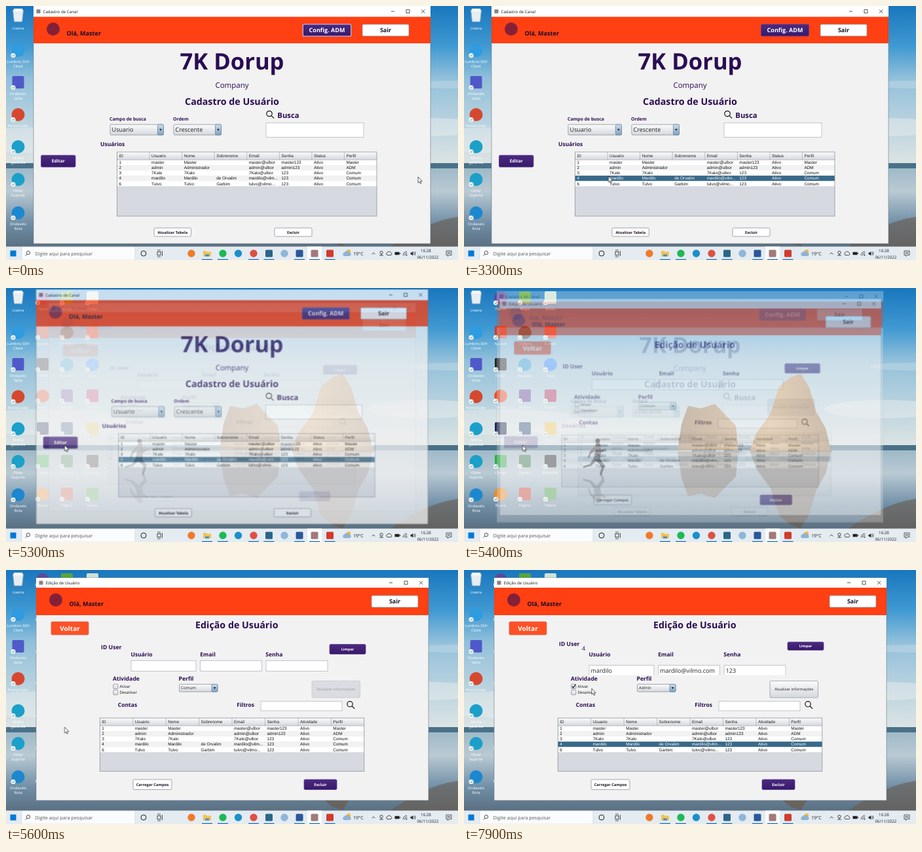
Recreate the animation shown at these times as an HTML page. Size 690 by 388 pixels, loop 8000 ms.

```html
<!DOCTYPE html>
<html lang="pt-BR">
<head>
<meta charset="utf-8">
<title>Cadastro de Usuário</title>
<style>
html, body { margin: 0; width: 100%; height: 100%; overflow: hidden; background: #4b9fd4; }
svg { display: block; width: 100%; height: 100%; text-rendering: geometricPrecision; }
text { font-family: "Open Sans", "Noto Sans", sans-serif; }
.cell { font-family: "Liberation Sans", Arial, sans-serif; }
.b { font-weight: 700; }
.mid { text-anchor: middle; }
.anim { animation: 8s step-end -5ms infinite; transform-origin: 345px 182px; }
#list { animation-name: closing; }
#edit { animation-name: opening; }
#ring { animation-name: blur; }
#listSel { animation-name: pickList; }
#editSel { animation-name: pickEdit; }
#blank { animation-name: drop; }
#filled { animation-name: fill; }
#cursor { animation-name: move; transform-origin: 0 0; }
@keyframes closing {
  0%, 65% { opacity: 1; transform: none; }
  66.25% { opacity: .75; transform: scale(.987); }
  67.5% { opacity: .28; transform: scale(.974); }
  68.75%, 100% { opacity: 0; transform: scale(.96); }
}
@keyframes opening {
  0%, 65% { opacity: 0; transform: scale(.92); }
  66.25% { opacity: .1; transform: scale(.935); }
  67.5% { opacity: .42; transform: scale(.972); }
  68.75% { opacity: .92; transform: scale(.996); }
  70%, 100% { opacity: 1; transform: none; }
}
@keyframes blur { 0% { opacity: 1; } 41.25%, 100% { opacity: 0; } }
@keyframes pickList { 0% { opacity: 0; } 41.25%, 100% { opacity: 1; } }
@keyframes pickEdit { 0% { opacity: 0; } 95%, 100% { opacity: 1; } }
@keyframes drop { 0% { opacity: 1; } 97.5%, 100% { opacity: 0; } }
@keyframes fill { 0% { opacity: 0; } 97.5%, 100% { opacity: 1; } }
</style>
</head>
<body>
<svg id="stage" viewBox="0 0 690 388" preserveAspectRatio="none">
  <defs>
    <linearGradient id="sky" x2="0" y2="1">
      <stop offset="0" stop-color="#1a77bd"/><stop offset=".25" stop-color="#3f99d2"/>
      <stop offset=".45" stop-color="#92c0da"/><stop offset="1" stop-color="#dfe5e4"/>
    </linearGradient>
    <linearGradient id="sand" x2="0" y2="1">
      <stop offset="0" stop-color="#9fb9c8"/><stop offset=".25" stop-color="#b9cad3"/>
      <stop offset=".6" stop-color="#6f8ea6"/><stop offset="1" stop-color="#4f5f6d"/>
    </linearGradient>
    <linearGradient id="rock" x2="1" y2="0">
      <stop offset="0" stop-color="#8c6a48"/><stop offset=".6" stop-color="#cfa168"/><stop offset="1" stop-color="#94704c"/>
    </linearGradient>
    <linearGradient id="grey" x2="0" y2="1">
      <stop offset="0" stop-color="#fbfbfc"/><stop offset="1" stop-color="#d5d8dd"/>
    </linearGradient>
    <linearGradient id="blue" x2="0" y2="1">
      <stop offset="0" stop-color="#cfdde9"/><stop offset="1" stop-color="#7fa3c2"/>
    </linearGradient>
    <linearGradient id="violet" x2="0" y2="1">
      <stop offset="0" stop-color="#4b2a80"/><stop offset="1" stop-color="#38196a"/>
    </linearGradient>
  </defs>
</svg>
<script>
const INK = '#2a0d52', ORANGE = '#ff4013';

const rect = (x, y, w, h, fill, more = '') =>
  `<rect x="${x}" y="${y}" width="${w}" height="${h}" fill="${fill}" ${more}/>`;
const dot = (x, y, r, fill, more = '') => `<circle cx="${x}" cy="${y}" r="${r}" fill="${fill}" ${more}/>`;
const line = (d, color, w = .8) => `<path d="${d}" fill="none" stroke="${color}" stroke-width="${w}"/>`;
const text = (x, y, size, s, fill = INK, cls = '') =>
  `<text x="${x}" y="${y}" font-size="${size}" fill="${fill}" class="${cls}">${s}</text>`;
const bold = (x, y, size, s, fill = INK) => text(x, y, size, s, fill, 'b');
const group = (id, body) => `<g id="${id}" class="anim">${body}</g>`;

function button(x, y, w, h, s, size, fill, color, edge, weight = 'b') {
  return rect(x, y, w, h, fill, `rx="1.8" stroke="${edge}" stroke-width=".8"`) +
    text(x + w / 2, y + h / 2 + size * .36, size, s, color, weight + ' mid');
}
const purple = (x, y, w, h, s, size) => button(x, y, w, h, s, size, 'url(#violet)', '#fff', '#5c4390');
const white = (x, y, w, h, s, size) => button(x, y, w, h, s, size, '#fff', '#1d1426', '#8d9199');
const field = (x, y, w, h) => rect(x, y, w, h, '#fff', 'stroke="#b4b8be" stroke-width=".8"');

function combo(x, y, w, h, s, size) {
  const ax = x + w - 4.5, ay = y + h / 2;
  return rect(x, y, w, h, 'url(#grey)', 'rx="1.5" stroke="#8a9098" stroke-width=".8"') +
    rect(x + w - 9, y, 9, h, 'url(#blue)', 'rx="1.5" stroke="#5d7d99" stroke-width=".7"') +
    `<path d="M${ax - 2} ${ay - 1.3}h4l-2 3z" fill="#1c2733"/>` +
    text(x + 2.6, ay + size * .36, size, s, '#222');
}

function lens(x, y, r) {
  return `<g fill="none" stroke="#151515" stroke-width="1.2"><circle cx="${x}" cy="${y}" r="${r}"/>` +
    `<path d="M${x + r * .7} ${y + r * .7}l${r} ${r}"/></g>`;
}

const users = [
  ['1', 'master', 'Master', '', 'master@ulbor', 'master123', 'Ativo', 'Master'],
  ['2', 'admin', 'Administrador', '', 'admin@ulbor', 'admin123', 'Ativo', 'ADM'],
  ['3', '7Kalo', '7Kalo', '', '7Kalo@ulbor', '123', 'Ativo', 'Comum'],
  ['4', 'mardilo', 'Mardilo', 'de Orvalim', 'mardilo@vilm...', '123', 'Ativo', 'Comum'],
  ['6', 'Tulvo', 'Tulvo', 'Garbim', 'tulvo@vilmo...', '123', 'Ativo', 'Comum']
];

function table(x, y, w, h, status, selId) {
  const cw = w / 8, rh = 8.05, top = y + 12;
  const cells = (row, by, color) => row.map((s, i) =>
    text(x + i * cw + 3, by, 6.4, s, color, 'cell')).join('');
  const rowY = i => top + i * rh;
  let out = rect(x, y, w, h, '#d6d9df') + rect(x, y, w, 12, 'url(#grey)');
  users.forEach((u, i) => {
    out += rect(x, rowY(i), w, rh, i % 2 ? '#f2f2f2' : '#fff') + cells(u, rowY(i) + 6.3, '#111');
  });
  out += group(selId, rect(x, rowY(3), w, rh, '#39698a') + cells(users[3], rowY(3) + 6.3, '#fff'));
  out += cells(['ID', 'Usuario', 'Nome', 'Sobrenome', 'Email', 'Senha', status, 'Perfil'], y + 8.2, '#222');
  for (let i = 1; i < 8; i++) out += line(`M${x + i * cw} ${y}v12`, '#a4a9b1', .7);
  return out + line(`M${x} ${top}h${w}`, '#a4a9b1', .7) +
    rect(x, y, w, h, 'none', 'stroke="#8e939b" stroke-width=".8"');
}

function frame(x, y, w, h, bar, head, title) {
  const cy = y + bar / 2, r = x + w;
  return rect(x, y, w, h, '#f2f2f2', 'stroke="#6d7780" stroke-width=".6"') + rect(x, y, w, bar, '#fff') +
    rect(x + 4.5, cy - 3, 6, 6, '#8c7f85') + text(x + 14.5, cy + 2.4, 6.2, title, '#111') +
    line(`M${r - 60} ${cy}h5M${r - 14} ${cy - 2.7}l5.4 5.4m0 -5.4l-5.4 5.4`, '#111', .7) +
    rect(r - 37, cy - 2.5, 5, 5, 'none', 'stroke="#111" stroke-width=".7"') +
    rect(x, y + bar, w, head, ORANGE) +
    dot(x + 30, y + bar + 18.7, 10, '#852039') +
    bold(x + 50.5, y + bar + 28, 9.1, 'Olá, Master', '#1c0a24');
}

function listWindow() {
  return frame(42, 0, 606, 363, 16.5, 40.5, 'Cadastro de Canal') +
    purple(453.5, 28, 73, 18, 'Config. ADM', 9) +
    group('ring', rect(453.3, 27.8, 73.4, 18.4, 'none', 'rx="2" stroke="#b9b6df" stroke-width="1.3"')) +
    white(544, 28, 71, 18, 'Sair', 9) +
    text(345, 97, 34.6, '7K Dorup', INK, 'b mid') +
    text(345, 125, 11.5, 'Company', INK, 'mid') +
    text(345, 151, 14.25, 'Cadastro de Usuário', INK, 'b mid') +
    bold(158, 174.6, 6.9, 'Campo de busca') + bold(255, 174.6, 6.9, 'Ordem') +
    combo(159, 181, 81.5, 16, 'Usuario', 9) + combo(256, 181, 72.5, 16, 'Crescente', 9) +
    lens(402, 164.5, 4.2) + bold(414.3, 171, 11.3, 'Busca') + field(397, 178.5, 149, 22) +
    bold(144, 214.3, 8.5, 'Usuários') +
    purple(53.5, 228, 52.5, 18, 'Editar', 6.7) +
    table(169.5, 223, 396.5, 98, 'Status', 'listSel') +
    white(226, 339, 56.5, 13, 'Atualizar Tabela', 5.7) + white(410, 339, 57, 13, 'Excluir', 5.7);
}

function formTop(loaded) {
  const y = loaded ? 145.5 : 138.5, lx = [191, 296.5, 397], w = [99, 94, 94];
  const values = ['mardilo', 'mardilo@vilmo.com', '123'];
  let out = bold(145, loaded ? 116 : 121, 8.7, 'ID User');
  if (loaded) out += text(180, 122.5, 9, '4');
  out += loaded ? purple(494, 110, 55, 12.5, 'Limpar', 5.5) : purple(494, 113.5, 55, 15, 'Limpar', 5.5);
  lx.forEach((x, i) => {
    if (!loaded) { out += field(x, y, w[i], 16); return; }
    out += rect(x, y, w[i], 15, '#fff') + line(`M${x} ${y + 15}V${y}h${w[i]}v15`, '#b4b8be') +
      text(x + 2.6, 157.3, 9, values[i], '#222');
  });
  out += combo(264.5, 174.5, 58.5, 11.5, loaded ? 'Admin' : 'Comum', 6.2);
  out += loaded
    ? button(467, 169.5, 73.5, 25.5, 'Atualizar informações', 5.8, 'url(#grey)', '#222', '#969ba3', '')
    : button(467, 169.5, 73.5, 25.5, 'Atualizar informações', 5.8, '#dadce1', '#999ca3', '#c4c7cc', '');
  if (loaded) out += line('M165 177.6l1.8 2.2 3.5 -4.9', '#111', 1.2);
  return out;
}

function editWindow() {
  const check = y => rect(163.8, y, 7, 7, 'url(#grey)', 'rx="1" stroke="#868b93" stroke-width=".8"');
  return frame(46, 12, 599, 340, 15, 42, 'Edição de Usuário') +
    white(558, 39, 71, 18, 'Sair', 9) +
    button(69, 79, 57, 20, 'Voltar', 10, '#ff5126', '#fff', '#d9664a') +
    text(352.3, 89, 14.25, 'Edição de Usuário', INK, 'b mid') +
    bold(190.5, 132, 8.5, 'Usuário') + bold(296.3, 132, 8.5, 'Email') + bold(396.3, 132, 8.5, 'Senha') +
    check(174.5) + check(183.6) +
    text(173.5, 180.4, 6, 'Ativar', '#111') + text(173.5, 189.4, 6, 'Desativar', '#111') +
    group('blank', formTop(false)) + group('filled', formTop(true)) +
    bold(163, 168.5, 8.6, 'Atividade') + bold(263.5, 168.5, 8.6, 'Perfil') +
    bold(170.8, 209, 8.5, 'Contas') + bold(352.3, 209, 8.5, 'Filtros') +
    field(389, 200.5, 124, 14.5) + lens(525, 204.8, 4.2) +
    table(143.3, 226, 403.5, 81.5, 'Atividade', 'editSel') +
    white(194, 320, 59, 15.5, 'Carregar Campos', 5.8) + purple(455, 320, 50, 15.5, 'Excluir', 5.8);
}

function scenery() {
  const cloud = (x, y, rx, ry, o) => `<ellipse cx="${x}" cy="${y}" rx="${rx}" ry="${ry}" fill="#e9eeee" opacity="${o}"/>`;
  const rocks = 'M326 248L332 208 342 180 362 184 383 177 402 197 415 210 419 248Z' +
    'M436 250L446 222 468 192 481 150 499 136 514 131 527 152 538 190 552 214 561 250Z';
  const runner = 'M203 237l5 1 1 10 7 -3 1 2 -8 5 -1 10 7 9 -5 15h-3l3 -13 -8 -9 -8 8 -12 3v-3l10 -3 6 -9 2 -11 -6 4 -3 7 -2 -1 3 -9z';
  return rect(0, 0, 690, 246, 'url(#sky)') + cloud(640, 185, 90, 14, .5) + cloud(60, 205, 130, 20, .45) +
    cloud(250, 215, 150, 16, .4) + cloud(680, 120, 60, 6, .25) +
    rect(0, 240, 690, 9, '#4a7189') + rect(0, 248, 690, 140, 'url(#sand)') +
    `<path d="${rocks}" fill="url(#rock)"/>` +
    `<path d="${rocks}" fill="#6d5641" opacity=".6" transform="translate(0 498) scale(1 -1)"/>` +
    `<path d="M560 388Q630 330 690 322V388Z" fill="#695b4e" opacity=".6"/>` +
    `<g fill="#2d3036"><circle cx="204" cy="234" r="3.5"/><path d="${runner}"/></g>` +
    `<path d="${runner}" fill="#2d3036" opacity=".45" transform="translate(0 566) scale(1 -1)"/>`;
}

function icon(x, y, kind, color, ...lines) {
  const shape = kind ? rect(x - 9, y - 10, 18, 19, color, 'rx="2"') : dot(x, y, 10, color);
  return shape + dot(x - 7.5, y + 7.5, 3.6, '#f4f8f8') + line(`M${x - 9.3} ${y + 7.5}l1.4 1.5 2.4 -3`, '#1d7f78', .8) +
    lines.map((s, i) => text(x, y + 18.6 + i * 7.2, 5.7, s, '#fff', 'mid')).join('');
}

function desktop() {
  const rows = [15, 68, 117, 165, 215, 265, 315];
  const cols = [
    [56, ['0#5a4a9c Painel', '1#c8402f Ajustes', '1#20262b Editor', '0#e8502c Leitor', '1#1f2a55 Grade', '1#2fae4a Cartas', '0#f08a24 Busca']],
    [93, ['1#58a53a Mapa', '0#24292e Códigos', '0#2a9fd8 Recados', '1#6b4fa0 Janelas', '1#3b5a86 Caixa', '1#3a7a52 Painéis', '1#d0463b Página']],
    [132, ['1#cfe3d4 Notas', '1#d8402c Cursos', '0#2d8cff Salas', '1#b03a6a Projeto', '1#f0cd6a Pasta', '1#26262a Gravador', '1#4aa04a Vídeos']]
  ];
  let out = scenery() +
    '<path d="M10.5 6h16l-2 18h-12z" fill="#e6eef3" stroke="#9db0bd"/>' + rect(12, 4, 13, 4, '#fbfdfe') +
    text(18.5, 35.5, 5.7, 'Lixeira', '#fff', 'mid') +
    icon(18.5, 68, 0, '#2f9be0', 'Lumbrio SSH', 'Client') + icon(18.5, 117, 1, '#5059c9', 'Ondavelo', 'Salas') +
    icon(18.5, 166, 0, '#d5482f', 'PomoCoder') + icon(18.5, 215, 0, '#1ba0c9', 'Minha', 'garantia') +
    icon(18.5, 265, 0, '#1ba0c9', 'Obter', 'Suporte') + icon(18.5, 316, 0, '#1d88cf', 'Ondavelo', 'Rota');
  for (const [x, items] of cols)
    items.forEach((s, i) => { out += icon(x, rows[i], +s[0], s.slice(1, 8), s.slice(9)); });
  return out;
}

function taskbar() {
  const apps = [[283, 0, '#f07a28'], [331, 0, '#1db954'], [354.5, 0, '#1b8fc9'], [378, 0, '#dd5144'],
    [401.5, 1, '#2b6588'], [425, 0, '#8fb6d8'], [448, 1, '#2b579a'], [471, 1, '#a3797a'], [494.5, 1, '#d23a2c']];
  let out = rect(0, 367.5, 690, 20.5, '#e4ebf1') + rect(6.5, 373.5, 9, 9, '#0078d7') +
    rect(24, 368, 173, 20, '#fbfcfd', 'stroke="#c5cbd0" stroke-width=".5"') +
    '<g fill="none" stroke="#333" stroke-width=".8"><circle cx="34" cy="377" r="2.7"/><path d="M32 379l-2.5 2.7"/></g>' +
    text(44.5, 380.6, 7.2, 'Digite aqui para pesquisar', '#555') +
    dot(210, 378, 4, 'none', 'stroke="#222"') +
    rect(231, 375.5, 5, 5, 'none', 'stroke="#222" stroke-width=".8"') + line('M238.5 374v8M231 373h5M231 383h5', '#222') +
    rect(460, 367.5, 22, 20.5, '#fafcfd') +
    '<path d="M301 374h4l1.5 1.5H313v7H301z" fill="#f3c24b"/>' + rect(304, 379.5, 6, 3, '#3f8fd0');
  for (const [x, sq, c] of apps) out += sq ? rect(x - 5.5, 372.5, 11, 11, c, 'rx="1.5"') : dot(x, 378, 5.7, c);
  for (const x of [307, 331, 378, 401.5, 448, 471, 494.5]) out += rect(x - 8, 386.7, 16, 1.3, '#1a73c0');
  return out + dot(523, 375, 3, '#f4b62e') +
    '<path d="M516 382a2.8 2.8 0 0 1 .5-5.4 3.6 3.6 0 0 1 6.6-.3 2.9 2.9 0 0 1 1.2 5.7z" fill="#8fb3d4"/>' +
    text(530, 380.7, 7.1, '19°C', '#222') +
    line('M558.5 379.3l2.5 -2.5 2.5 2.5', '#222') +
    dot(573, 376.6, 2.2, 'none', 'stroke="#222" stroke-width=".8"') + line('M570 381h6M573 379v2', '#222') +
    '<path d="M582 380.5a2.3 2.3 0 0 1 .6-4.3 3 3 0 0 1 5.2 1 1.8 1.8 0 0 1 0 3.3z" fill="none" stroke="#222" stroke-width=".8"/>' +
    rect(593.5, 375.8, 7, 4.4, '#222') + rect(601, 377, 1, 2, '#222') +
    line('M606 381a7 7 0 0 1 6 -6M608.3 381.3a4.5 4.5 0 0 1 4 -4', '#222') + dot(611.5, 380.5, .9, '#222') +
    '<path d="M617.5 376.7h1.6l2.2-2v6.8l-2.2-2h-1.6z" fill="#222"/>' + line('M622.5 376q1.6 2 0 4M624 375q2.4 3 0 6', '#222', .7) +
    text(641, 375.6, 6.2, '16:28', '#222', 'mid') + text(644, 386, 6.2, '06/11/2022', '#222', 'mid') +
    line('M672 374h8v6.5h-3.5l-2 2v-2H672zM673.5 376.3h5M673.5 378.2h5', '#222', .7);
}

// Pointer stops: time in ms, x, y
const path = [
  [0, 629, 261], [500, 560, 300], [900, 443, 344], [1200, 360, 367], [1400, 289, 308], [1500, 289, 308],
  [1800, 250, 241], [2200, 212, 281], [2600, 222, 259], [3200, 222, 259], [3400, 219, 261], [4000, 219, 261],
  [4400, 138, 250], [4900, 92, 242], [5000, 89.5, 240], [5600, 89.5, 240], [6000, 150, 241], [6300, 230, 145],
  [6700, 420, 148], [6900, 264, 165], [7100, 214, 257], [7200, 214, 257], [7400, 215, 266], [7500, 215, 266],
  [7600, 217, 290], [7700, 222, 324], [7800, 206, 240], [7900, 195, 181], [8000, 195, 181]
];
const stops = path.map(([t, x, y], i) => {
  const n = i + 1 < path.length ? (path[i + 1][0] - t) / 100 : 1;
  return `${t / 80}%{transform:translate(${x}px,${y}px);animation-timing-function:steps(${n})}`;
});
const style = document.createElement('style');
style.textContent = `@keyframes move{${stops.join('')}}`;
document.head.append(style);

const arrow = '<path d="M0 0V9.2L2.1 7.3 3.5 10.4 4.9 9.8 3.5 6.8H6.4Z" fill="#fff" stroke="#111" stroke-width=".65"/>';
document.getElementById('stage').insertAdjacentHTML('beforeend',
  desktop() + group('list', listWindow()) + group('edit', editWindow()) + taskbar() + group('cursor', arrow));
</script>
</body>
</html>
```
